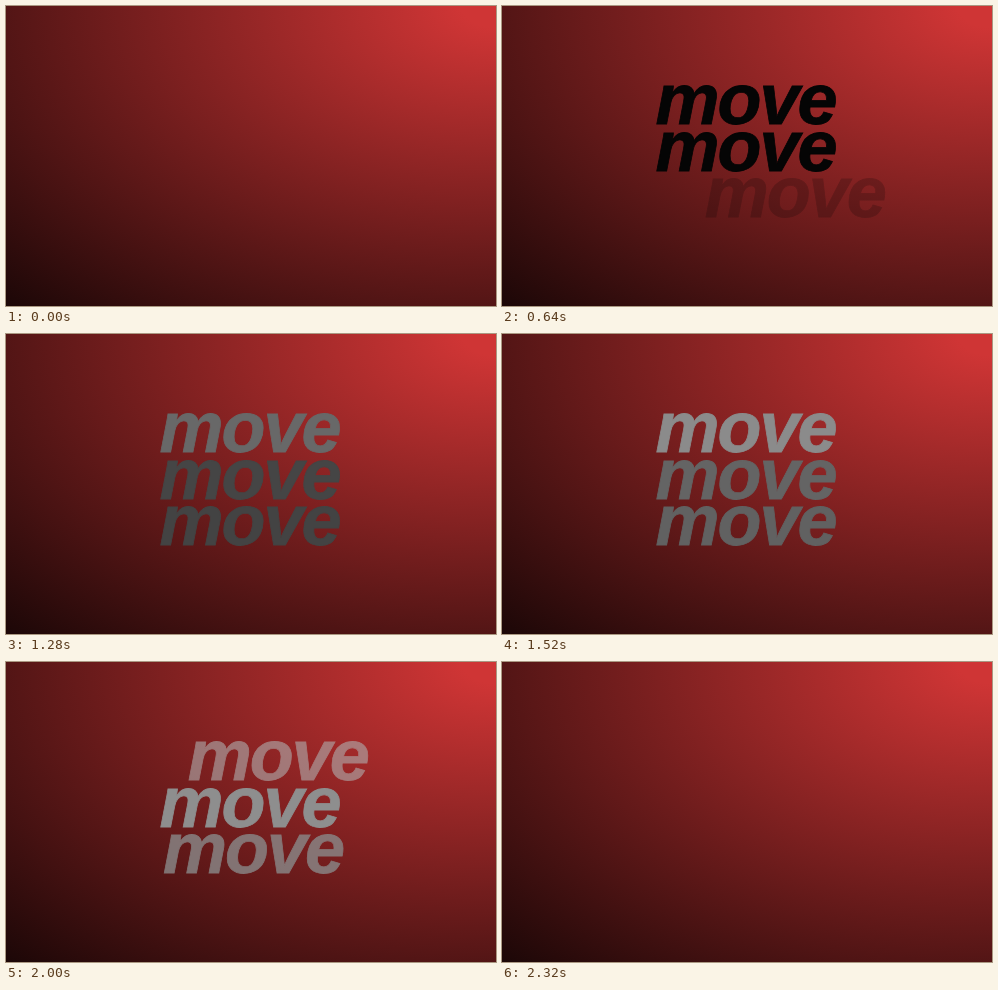
These frames come from a looping animation (490x300 px, 2680 ms). An HTML page:

```html
<!DOCTYPE html>
<html lang="en">
<head>
<meta charset="utf-8">
<title>move</title>
<style>
  html, body { margin: 0; width: 100%; height: 100%; overflow: hidden; }
  body { background: radial-gradient(ellipse farthest-corner at 100% 0, #cf3535 5%, #1c0707 100%); }
  svg { display: block; width: 490px; height: 300px; }
  text {
    font: italic bold 72px "Liberation Sans", Arial, sans-serif;
    letter-spacing: -2px;
    stroke-width: .8px;
  }
</style>
</head>
<body>
<svg viewBox="0 0 490 300">
  <text x="153.5" y="118">move</text>
  <text x="153.5" y="164.7">move</text>
  <text x="153.5" y="211.3">move</text>
</svg>
<script>
const LOOP = 2680, STEP = 40;

// Times in ms; dx is the distance a word travels while leaving.
const lines = [
  { enter: 275, fade: 800, fadeTime: 1400, grey: 180, exit: 1920, exitTime: 200, dx: 280 },
  { enter: 440, fade: 880, fadeTime: 1700, grey: 160, exit: 2020, exitTime: 300, dx: -111 },
  { enter: 604, fade: 880, fadeTime: 1700, grey: 155, exit: 1950, exitTime: 250, dx: 190 }
];
const words = document.querySelectorAll("text");
const progress = (t, start, time) => Math.min(1, Math.max(0, (t - start) / time));

function draw(t) {
  lines.forEach((l, i) => {
    const p = progress(t, l.enter, 180);
    const q = progress(t, l.exit, l.exitTime);
    const f = progress(t, l.fade, l.fadeTime);
    const x = 150 * (1 - p) ** 5 + l.dx * q ** 2.5;
    const g = Math.round(5 + (l.grey - 5) * (1 - (1 - f) ** 2));
    const color = `rgb(${g},${g},${g})`;
    const word = words[i];
    word.setAttribute("transform", `translate(${x.toFixed(2)} 0)`);
    word.setAttribute("fill", color);
    word.setAttribute("stroke", color);
    word.setAttribute("opacity", p * (1 - q));
  });
}

const begin = performance.now();
function tick() {
  const t = (performance.now() - begin) % LOOP;
  draw(Math.floor(t / STEP) * STEP);
  requestAnimationFrame(tick);
}
tick();
</script>
</body>
</html>
```
